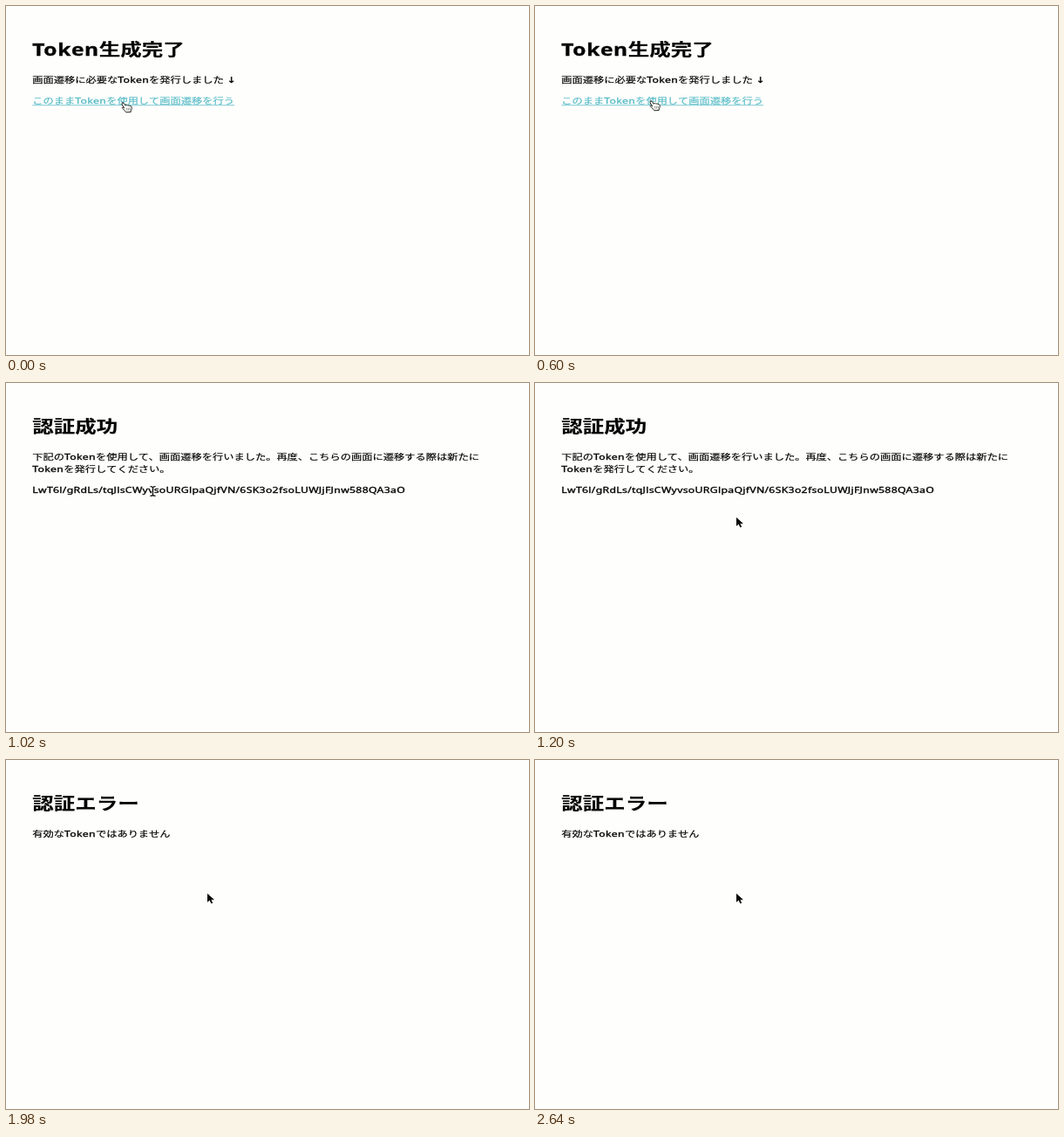
An HTML page with a canvas that plays this animation: 600 by 400 pixels, repeating every 2.7 s.

```html
<!DOCTYPE html>
<html lang="ja">
<head>
<meta charset="utf-8">
<title>Token</title>
<style>
html, body { margin: 0; width: 100%; height: 100%; overflow: hidden; background: #fefefc; }
canvas { display: block; width: 600px; height: 400px; }
</style>
</head>
<body>
<canvas id="stage" width="600" height="400"></canvas>
<script>
const ctx = document.getElementById('stage').getContext('2d');
const LOOP = 2700, STEP = 60;
// The browser page is shown squeezed, more in height than in width.
const SX = 0.765, SY = 0.595, LEFT = 30.3;
const LATIN = '"Noto Sans", "Open Sans", "DejaVu Sans", sans-serif';
const KANJI = '"Noto Sans CJK JP", "Noto Sans CJK", sans-serif';
const PAPER = '#fefefc', INK = '#050505', LINK = '#58bcc8';

const title = text => ({ text, y: 57, size: 32, weight: 'bold', ink: INK });
const line = (text, y, ink = INK, underline = false) =>
  ({ text, y, size: 16, weight: 'normal', ink, underline });

const pages = [
  { from: 0, lines: [
    title('Token生成完了'),
    line('画面遷移に必要なTokenを発行しました ↓', 87.7),
    line('このままTokenを使用して画面遷移を行う', 112.2, LINK, true)
  ] },
  { from: 660, lines: [
    title('認証成功'),
    line('下記のTokenを使用して、画面遷移を行いました。再度、こちらの画面に遷移する際は新たに', 87.7),
    line('Tokenを発行してください。', 102.4),
    line('LwT6l/gRdLs/tqJlsCWyvsoURGlpaQjfVN/6SK3o2fsoLUWJjFJnw588QA3aO', 126.2)
  ] },
  { from: 1980, lines: [
    title('認証エラー'),
    line('有効なTokenではありません', 87.7)
  ] }
];

// time, x, y of the pointer's hot spot
const path = [
  [0, 134, 111], [60, 134, 111], [360, 133, 109], [720, 133, 109],
  [900, 154, 118], [1020, 168.5, 124], [1080, 222, 150],
  [1140, 231, 155], [1260, 231, 153]
];

const hand = new Path2D('M0 0C1.2-.4 2 1 3 3.2L3.6 2.8C4.6 2.2 5.4 2.6 5.8 3.2' +
  'C6.8 2.6 7.6 3 8 3.6C9.4 3.2 10.2 4.2 10.2 5.2C10.4 7 9.8 8 9.2 9V10.5L3.8 10.8' +
  'C3 9 1 8-.4 6.4C-1.2 5.4-.2 4.6.8 5.4L1.6 6L-.8 2C-1.4 1-.8 0 0 0Z');
const creases = new Path2D('M4.4 6.2L5 8.6M6.2 6L6.8 8.4M8 5.8L8.4 8');
const arrow = new Path2D('M0 0V10L2.6 7.8L4.4 11.6L6.2 11L4.4 7.2H8Z');
const beam = new Path2D('M-2.6-5.4Q-.4-5.4 0-4.2Q.4-5.4 2.6-5.4M0-4.2V4.2' +
  'M-2.6 5.4Q-.4 5.4 0 4.2Q.4 5.4 2.6 5.4');

function stroke(shape, color, width) {
  ctx.strokeStyle = color;
  ctx.lineWidth = width;
  ctx.stroke(shape);
}

function drawLine({ text, y, size, weight, ink, underline }) {
  ctx.save();
  ctx.translate(LEFT, y);
  ctx.scale(SX, SY);
  ctx.fillStyle = ctx.strokeStyle = ink;
  let x = 0;
  for (const run of text.match(/[ -~↓]+|[^ -~↓]+/g)) {
    const latin = /[ -~]/.test(run);
    ctx.font = `${weight} ${size}px ${latin ? LATIN : KANJI}`;
    ctx.letterSpacing = latin ? `${size * 0.025}px` : '0px';
    ctx.lineWidth = latin ? 0.55 : 0.3;
    ctx.fillText(run, x, 0);
    ctx.strokeText(run, x, 0);
    x += ctx.measureText(run).width;
  }
  if (underline) ctx.fillRect(0, 2, x, 1.3);
  ctx.restore();
}

function pointerAt(t) {
  const i = path.findIndex(p => p[0] > t);
  if (i < 0) return path[path.length - 1].slice(1);
  const [t0, x0, y0] = path[i - 1], [t1, x1, y1] = path[i];
  const k = (t - t0) / (t1 - t0);
  return [x0 + (x1 - x0) * k, y0 + (y1 - y0) * k];
}

function drawPointer(t) {
  const [x, y] = pointerAt(t);
  ctx.save();
  ctx.translate(x, y);
  ctx.lineJoin = ctx.lineCap = 'round';
  if (t < 780) {
    ctx.fillStyle = PAPER;
    ctx.fill(hand);
    stroke(hand, '#22221c', 1);
    stroke(creases, '#55554a', 0.6);
  } else if (t < 1080) {
    stroke(beam, PAPER, 2.4);
    stroke(beam, INK, 1.2);
  } else {
    stroke(arrow, PAPER, 1.8);
    ctx.fillStyle = INK;
    ctx.fill(arrow);
  }
  ctx.restore();
}

function frame(now) {
  const t = Math.floor((now % LOOP) / STEP) * STEP;
  ctx.fillStyle = PAPER;
  ctx.fillRect(0, 0, 600, 400);
  pages.filter(p => p.from <= t).pop().lines.forEach(drawLine);
  drawPointer(t);
  requestAnimationFrame(frame);
}
requestAnimationFrame(frame);
</script>
</body>
</html>
```
